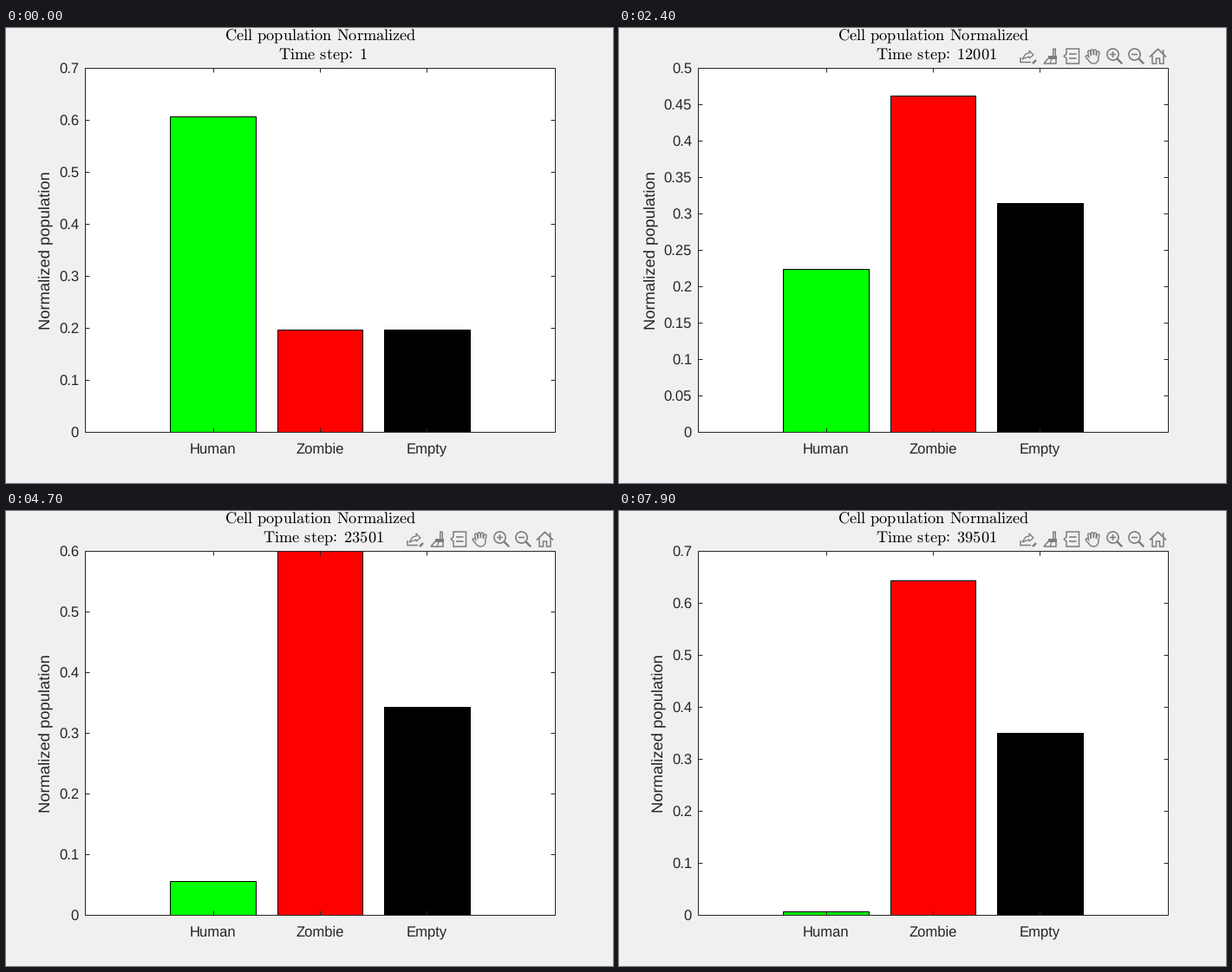
These frames come from a looping animation (700x525 px, 8 s). A matplotlib script:

```python
import numpy as np
import matplotlib.pyplot as plt
from matplotlib.animation import FuncAnimation
from matplotlib.collections import LineCollection
from matplotlib.patches import Ellipse, Rectangle

plt.rcParams["font.family"] = "Liberation Sans"
plt.rcParams["mathtext.fontset"] = "cm"
plt.rcParams["text.hinting"] = "none"

W, H, DPI = 700, 525, 100
FRAMES, INTERVAL = 80, 100
PX = 72 / DPI  # one pixel in points
L, R, T, B = 91.5, 633.5, 46.5, 466.5
PAPER, INK, ICON = "#f0f0f0", "#262626", "#7c7c7c"
BARS = {"Human": "#00ff00", "Zombie": "#ff0000", "Empty": "#000000"}


def shares(t):
    """Humans die out along a logistic curve, leaving zombies and empty cells."""
    def spread(t):
        return np.log1p(np.exp(0.0635 * (t - 5.5)))

    human = 0.6067 * np.exp(-1.096 * (spread(t) - spread(0)))
    empty = 0.3504 - human * (0.122 + 0.16 * human + 0.092 * human ** 2)
    return human, 1 - human - empty, empty


fig = plt.figure(figsize=(W / DPI, H / DPI), dpi=DPI, facecolor=PAPER)
ax = fig.add_axes([0, 0, 1, 1])
ax.set_xlim(0, W)
ax.set_ylim(H, 0)
ax.axis("off")


def box(x0, x1, y0, y1, fc, ec, z):
    return ax.add_patch(Rectangle((x0, y0), x1 - x0, y1 - y0, fc=fc, ec=ec,
                                  lw=PX, snap=False, zorder=z))


def tick_lines(segments):
    lines = LineCollection(segments, colors=INK, linewidths=PX, zorder=3)
    lines.set_snap(False)
    return ax.add_collection(lines, autolim=False)


def label(x, y, s="", size=50 / 3, color=INK, **kw):
    return ax.text(x, y, s, fontsize=size * PX, color=color,
                   va="baseline", **kw)


# Plot area, bars and frame
box(L, R, T, B, "white", "none", 1)
box(L, R, T, B, "none", INK, 3)
bars = []
for i, (name, color) in enumerate(BARS.items()):
    c = 239 + 123.4 * i
    x0, x1 = (int(c + s * 49.3) + 0.5 for s in (-1, 1))
    bars.append(box(x0, x1, B, B, color, "black", 2))
    tick = int(c) + 0.5
    tick_lines([[(tick, T), (tick, T + 5)], [(tick, B - 5), (tick, B)]])
    label(c - 0.4, 491, name, ha="center")

y_ticks = tick_lines([])
y_labels = [label(84, B, ha="right") for _ in range(11)]
y_title = label(50, 256.5, "Normalized population", 18.33, ha="center",
                rotation=90, rotation_mode="anchor")
label(362.5, 14, r"$\mathrm{Cell\hspace{0.38}population\hspace{0.38}Normalized}$",
      18.33, "black", ha="center")
STEP = r"$\mathrm{Time\hspace{0.38}step\hspace{-0.2}:\hspace{0.306}%d}$"
step_title = label(366, 36, STEP % 1, 18.33, "black", ha="center")

# Toolbar icons, one every 25 pixels
icons = []


def stroke(*pts, lw=1.6, color=ICON, z=4, cap="butt"):
    icons.extend(ax.plot(*zip(*pts), color=color, lw=lw * PX, snap=False,
                         zorder=z, solid_capstyle=cap,
                         solid_joinstyle="miter"))


def oval(x, y, rx, ry, fc="none", ec="none", z=4):
    icons.append(ax.add_patch(Ellipse((x, y), 2 * rx, 2 * ry, fc=fc, ec=ec,
                                      lw=1.6 * PX, zorder=z)))


def export(x):
    stroke((x - 7, 36), (x - 3, 30), (x + 1, 29), (x + 1, 26), (x + 6, 31),
           (x + 1, 35), (x + 1, 33), (x - 7, 36), lw=1.3)
    stroke((x - 9, 34), (x - 9, 39.5), (x + 3, 39.5), lw=1.5)
    stroke((x + 5, 41), (x + 9, 37), lw=2.5)


def brush(x):
    stroke((x + 5, 23.5), (x + 5, 33), lw=4)
    stroke((x + 5, 25), (x + 5, 32), lw=1, color=PAPER, z=5)
    stroke((x - 2, 34), (x + 8, 34), lw=4)
    stroke((x - 2, 35), (x - 7, 41), (x + 7, 41), (x + 7, 35), lw=1.5)
    stroke((x + 2, 36), (x, 41), lw=1.2)


def data_tip(x):
    stroke((x - 6, 30), (x - 6, 24), (x + 8.5, 24), (x + 8.5, 41),
           (x - 6, 41), (x - 6, 35), (x - 9, 32.5), (x - 6, 30), lw=1.5)
    for y in (30, 35):
        stroke((x - 3, y), (x + 5.5, y))


def hand(x):
    for color, z, lw, edge in ((ICON, 4, 4.2, 0), (PAPER, 5, 1.4, 1.4)):
        for i in range(4):
            stroke((x - 3.2 + 2.6 * i, 35),
                   (x - 4.4 + 3.5 * i, 26 + 0.8 * (i - 1.3) ** 2),
                   lw=lw, color=color, z=z, cap="round")
        stroke((x - 2.5, 38), (x - 7, 33), lw=lw, color=color, z=z, cap="round")
        oval(x + 0.8, 35.7, 6.2 - edge, 6 - edge, fc=color, z=z)


def magnifier(x, plus=False):
    oval(x, 30.5, 6.6, 6.6, ec=ICON)
    stroke((x + 4.6, 35.1), (x + 10.7, 41.2), lw=2.4)
    stroke((x - 3.5, 30.5), (x + 3.5, 30.5))
    if plus:
        stroke((x, 27), (x, 34))


def home(x):
    stroke((x - 9.5, 33.5), (x, 24.3), (x + 9.5, 33.5), lw=1.7)
    for s in (-1, 1):
        stroke((x + 6.5 * s, 31.5), (x + 6.5 * s, 41), (x + 2 * s, 41),
               (x + 2 * s, 35), (x, 35), lw=1.5)
    stroke((x + 6, 25), (x + 6, 30), lw=1.8)


export(472)
brush(497)
data_tip(522)
hand(546.5)
magnifier(569.5, plus=True)
magnifier(594.5)
home(621.5)


def update(n):
    values = shares(n)
    top = max(values)
    step = 0.05 if top <= 0.5 else 0.1
    count = int(np.ceil(top / step - 0.03))
    scale = (B - T) / (count * step)

    for bar, v in zip(bars, values):
        h = min(int(v * scale + 0.5), B - T)
        bar.set_y(B - h)
        bar.set_height(h)

    segments = []
    for i, text in enumerate(y_labels):
        text.set_visible(i <= count)
        if i <= count:
            y = B - int(i * step * scale + 0.5)
            text.set_text(f"{round(i * step, 2):g}")
            text.set_y(y + 6.5)
            segments += [[(L, y), (L + 5, y)], [(R - 5, y), (R, y)]]
    y_ticks.set_segments(segments)

    y_title.set_x(41 if step < 0.1 else 50)
    step_title.set_text(STEP % (500 * n + 1))
    for icon in icons:
        icon.set_visible(n > 0)
    return []


anim = FuncAnimation(fig, update, frames=FRAMES, interval=INTERVAL,
                     repeat=True, repeat_delay=0, blit=False)
plt.show()
```
